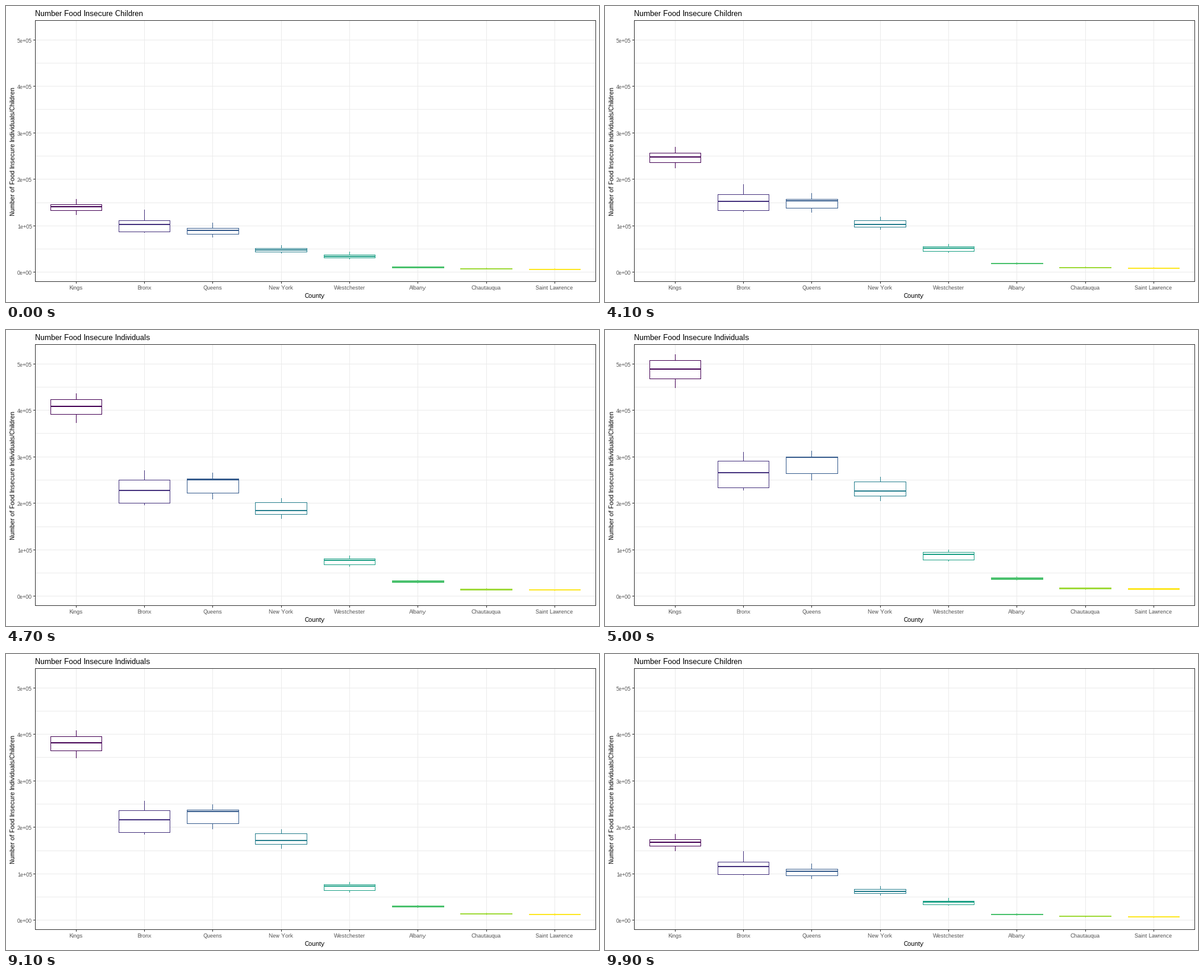
A matplotlib script for the animation above (10 s loop, 1000 by 500 pixels).

```python
import math

import matplotlib.pyplot as plt
from matplotlib.animation import FuncAnimation
from matplotlib.patches import Rectangle

W, H, DPI = 1000, 500, 100
FRAMES, INTERVAL = 100, 100
HOLD, MOVE = 37, 13            # frames at rest, frames to the next state
FIRST_X, SPACING, HALF_BOX = 118.45, 115.265, 43.27
ZERO_Y, PX_PER_K = 449.8, 0.7852
LEFT, TOP, RIGHT, BOTTOM = 49, 24, 994, 465
GRID, FRAME, TICK_TEXT = "#EBEBEB", "#333333", "#4D4D4D"
VIRIDIS = ("#440154", "#46337E", "#365C8D", "#277F8E",
           "#1FA187", "#4AC16D", "#9FDA3A", "#FDE725")

# Median of children and of individuals (thousands), relative box height,
# and the share of the individuals' box that lies above its median.
COUNTIES = {
    "Kings": (141.1, 488.8, 0.079, 0.47),
    "Bronx": (102.6, 265.9, 0.215, 0.44),
    "Queens": (89.9, 298.8, 0.122, 0.04),
    "New York": (48.7, 225.9, 0.135, 0.67),
    "Westchester": (34.6, 90.2, 0.175, 0.26),
    "Albany": (10.6, 38.0, 0.11, 0.59),
    "Chautauqua": (7.4, 16.8, 0.13, 0.5),
    "Saint Lawrence": (6.4, 15.4, 0.12, 0.5),
}

plt.rcParams.update({"font.family": "Liberation Sans",
                     "text.hinting": "native", "text.hinting_factor": 1})
fig = plt.figure(figsize=(W / DPI, H / DPI), dpi=DPI, facecolor="white")
ax = fig.add_axes([0, 0, 1, 1])
ax.set(xlim=(0, W), ylim=(H, 0))
ax.axis("off")


def row(thousands):
    return ZERO_Y - PX_PER_K * thousands


def summary(median, spread, above, upper, lower):
    """Pixel rows of max, q3, median, q1 and min.

    Wide boxes have short lower whiskers.
    """
    height = median * spread
    q3 = median + above * height
    q1 = q3 - height
    tail = lower * (0.95 - 3.9 * spread)
    return [row(v) for v in (q3 + upper * height, q3, median, q1, q1 - tail * height)]


def block(x0, y0, x1, y1, color, z=1):
    """Fill the pixels from (x0, y0) up to, not including, (x1, y1)."""
    return ax.add_patch(Rectangle((x0, y0), x1 - x0, y1 - y0, facecolor=color,
                                  linewidth=0, antialiased=False, zorder=z))


def label(x, y, text, px, color="black", **kw):
    return ax.text(x, y, text, fontsize=px * 72 / DPI, color=color,
                   va="baseline", zorder=9, **kw)


def set_rows(patch, y0, y1):
    patch.set_y(y0)
    patch.set_height(max(0, y1 - y0))


class Box:
    def __init__(self, x, color, children, individuals, spread, above):
        self.start = summary(children, 1.1 * spread, 0.36, upper=0.95, lower=1.2)
        self.end = summary(individuals, spread, above, upper=0.34, lower=0.8)
        x0, x1 = math.floor(x - HALF_BOX), math.floor(x + HALF_BOX) + 1
        xm = math.floor(x)
        self.whisker = block(xm, 0, xm + 1, 0, color, 2)
        self.outline = block(x0, 0, x1, 0, color, 3)
        self.inside = block(x0 + 1, 0, x1 - 1, 0, "white", 4)
        self.median = block(x0, 0, x1, 0, color, 5)

    def pose(self, t):
        rows = [a + (b - a) * t for a, b in zip(self.start, self.end)]
        high, q3, _, q1, low = map(math.floor, rows)
        mid = round(rows[2])
        set_rows(self.whisker, high, low + 1)
        set_rows(self.outline, q3, q1 + 1)
        set_rows(self.inside, q3 + 1, q1)
        set_rows(self.median, mid - 1, mid + 1)


for half in range(11):
    y = math.floor(row(50 * half))
    block(LEFT, y, RIGHT, y + 1, GRID)
    if half % 2 == 0:
        block(LEFT - 3, y, LEFT, y + 1, FRAME)
        label(44, y + 5, f"{half // 2}e+{'05' if half else '00'}", 9, TICK_TEXT,
              ha="right")

boxes = []
for i, (name, stats) in enumerate(COUNTIES.items()):
    x = FIRST_X + i * SPACING
    xm = math.floor(x)
    block(xm, TOP, xm + 1, BOTTOM, GRID)
    block(xm, BOTTOM + 1, xm + 1, BOTTOM + 4, FRAME)
    label(x - 0.5, 479, name, 9, TICK_TEXT, ha="center")
    boxes.append(Box(x, VIRIDIS[i], *stats))

for y in (TOP, BOTTOM):
    block(LEFT, y, RIGHT + 1, y + 1, FRAME, 8)
for x in (LEFT, RIGHT):
    block(x, TOP, x + 1, BOTTOM + 1, FRAME, 8)

title = label(49, 17, "", 13)
label(521, 493, "County", 11, ha="center")
label(15.5, 245.5, "Number of Food Insecure Individuals/Children", 11,
      rotation=90, rotation_mode="anchor", ha="center")


def update(frame):
    returning, local = divmod(frame, FRAMES // 2)
    t = max(0, local - HOLD) / MOVE
    # The title names the state that is nearer in time.
    switched = t > 0.54
    individuals = bool(returning) != switched
    title.set_text("Number Food Insecure " + ("Individuals" if individuals else "Children"))
    for box in boxes:
        box.pose(1 - t if returning else t)
    return []


anim = FuncAnimation(fig, update, frames=FRAMES, interval=INTERVAL,
                     repeat=True, repeat_delay=0, blit=False)
plt.show()
```
